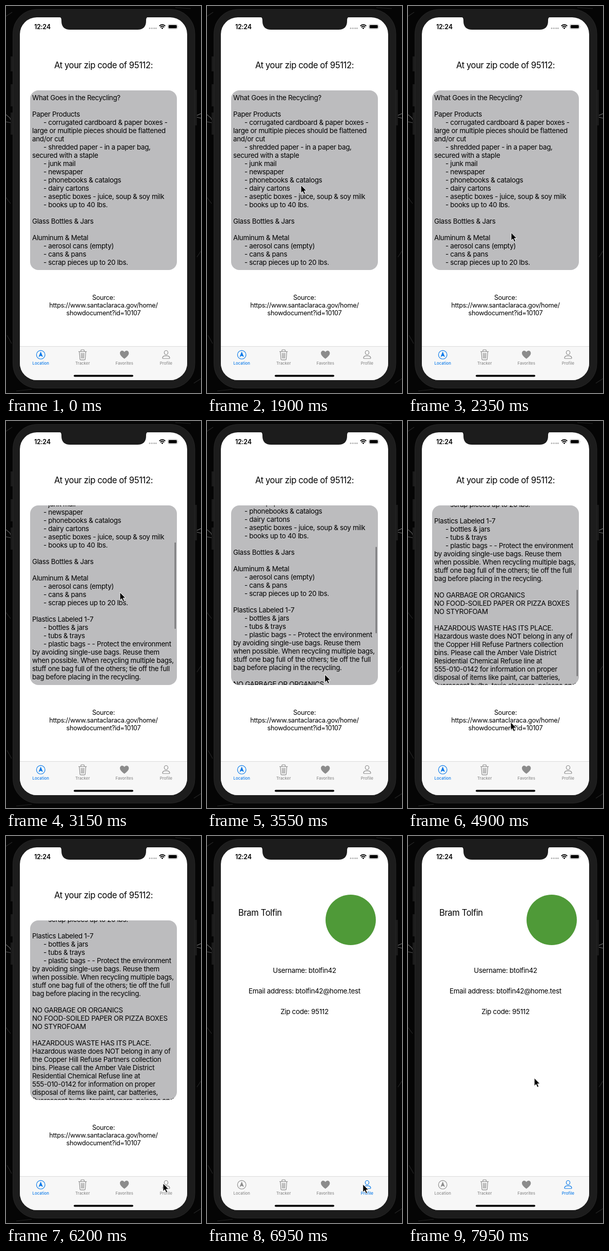
An HTML page for the animation above (8000 ms loop, 380x752 px).

```html
<!DOCTYPE html>
<html lang="en">
<head>
<meta charset="utf-8">
<title>Recycling guide</title>
<style>
html, body { margin: 0; width: 100%; height: 100%; overflow: hidden; background: #050505; }
svg { display: block; width: 380px; height: 752px; }
text { font: 13.4px Inter, "Liberation Sans", sans-serif; letter-spacing: -.023em; white-space: pre; }
.big { font-size: 16.6px; }
.mid { font-size: 12.7px; }
.clock { font-size: 12.6px; font-weight: 600; }
.tab text { font-size: 7.7px; font-weight: 500; letter-spacing: .01em; text-anchor: middle; fill: currentColor; }
.tab { color: #8c8c8c; fill: none; stroke: currentColor; stroke-width: 1.2; stroke-linecap: round; stroke-linejoin: round; }
.tab text, .solid { stroke: none; fill: currentColor; }
.tab.on { color: #0a7aea; }
.c { text-anchor: middle; }
</style>
</head>
<body>
<svg viewBox="0 0 380 752">
  <defs>
    <clipPath id="panelClip"><rect x="47" y="164" width="286" height="349" rx="16"/></clipPath>
    <clipPath id="screenClip"><rect x="27" y="22" width="326" height="705" rx="33"/></clipPath>
  </defs>

  <!-- desktop and phone body -->
  <rect width="380" height="752" fill="#050505"/>
  <g fill="none" stroke="#777" stroke-width="1.2" opacity=".7">
    <path d="M0 211l7 6 5 9M0 225l10 2" />
    <path d="M380 209l-9 4M380 218l-8-2" stroke="#999"/>
    <path d="M0 20l12-8M0 372l9 12M372 488l8-12M2 640l9 16M366 733l14-9M20 748l30-3M330 3l30 2" stroke="#333"/>
  </g>
  <path d="M11 98v29M11 152v43M11 207v43M370 163v69" stroke="#1a1a1a" stroke-width="4"/>
  <rect x="13.5" y="6.500" width="354.500" height="736" rx="47" fill="#1c1c1c" stroke="#262626"/>

  <g clip-path="url(#screenClip)">
    <rect x="27" y="22" width="326" height="705" fill="#fff"/>
    <path d="M102 21q6 0 6 6v2q0 17 17 17h131q17 0 17-17v-2q0-6 6-6z" fill="#1c1c1c"/>
    <text class="clock" x="55" y="44.500">12:24</text>
    <g fill="#b5b5b5"><circle cx="280" cy="43.300" r="1.500"/><circle cx="284.300" cy="43.300" r="1.500"/><circle cx="288.600" cy="43.300" r="1.500"/><circle cx="292.300" cy="43.300" r="1.500"/></g>
    <g fill="none" stroke="#000" stroke-width="1.900">
      <path d="M298.700 38.800q5.800-5 11.600 0M300.800 41.200q3.700-3.200 7.400 0"/>
      <path d="M302.400 42.800q2.100-1.500 4.200 0l-2.100 2.200z" fill="#000" stroke="none"/>
    </g>
    <rect x="315.500" y="35.800" width="18.500" height="8.700" rx="2.500" fill="none" stroke="#aaa" stroke-width=".8"/>
    <rect x="316.800" y="37" width="16" height="6.300" rx="1.500"/>
    <path d="M335.300 38.700q1.300 1.400 0 2.900z" fill="#999"/>

    <g id="guide">
      <text class="big c" x="190" y="121">At your zip code of 95112:</text>
      <rect x="47" y="164" width="286" height="349" rx="16" fill="#bcbcbe"/>
      <g clip-path="url(#panelClip)">
        <g id="list"></g>
        <rect id="bar" x="328.500" y="166" width="2.500" height="168" rx="1.250" fill="#777779"/>
      </g>
      <text class="mid c" x="190" y="570.500">Source:</text>
      <text class="mid c" x="190" y="585.500">https://www.santaclaraca.gov/home/</text>
      <text class="mid c" x="190" y="601">showdocument?id=10107</text>
    </g>

    <g id="profile">
      <text class="big" x="61" y="155">Bram Tolfin</text>
      <circle cx="280" cy="163" r="49" fill="#4f9a38"/>
      <text class="c" x="190" y="266">Username: btolfin42</text>
      <text class="c" x="190" y="306">Email address: btolfin42@home.test</text>
      <text class="c" x="190" y="345.500">Zip code: 95112</text>
    </g>

    <rect x="27" y="661" width="326" height="67" fill="#f7f7f7"/>
    <path d="M27 661.500h326" stroke="#d4d4d4" stroke-width=".8"/>
    <g class="tab" id="location">
      <circle cx="67.700" cy="677.700" r="8.300"/>
      <path class="solid" d="M67.700 671.500l4.300 10.500-4.300-2.200-4.300 2.200z"/>
      <text x="67.700" y="697">Location</text>
    </g>
    <g class="tab">
      <path d="M141.500 671.500h15.400M146 671v-2q0-1 1-1h4.400q1 0 1 1v2M143 672l1 14q.1 1.700 1.700 1.700h7q1.600 0 1.700-1.700l1-14M146.700 674.500l.3 10M149.200 674.500v10M151.700 674.500l-.3 10"/>
      <text x="149.200" y="697">Tracker</text>
    </g>
    <g class="tab">
      <path class="solid" d="M230.700 685.500c-4-3-8.700-6.600-8.700-11 0-5.200 6.500-6.600 8.700-2 2.200-4.600 8.700-3.200 8.700 2 0 4.400-4.700 8-8.700 11z"/>
      <text x="230.700" y="697">Favorites</text>
    </g>
    <g class="tab" id="user">
      <ellipse cx="312" cy="673.500" rx="3.600" ry="4"/>
      <path d="M306.500 685h11q1.700 0 1.500-1.400c-.7-5.300-13.300-5.300-14 0q-.2 1.400 1.500 1.400z"/>
      <text x="312" y="697">Profile</text>
    </g>
    <rect x="132" y="716.700" width="116" height="3.800" rx="1.900"/>
  </g>

  <path id="cursor" d="M0 0v15.500l3.500-3.300 2.500 5.800 2.700-1.200-2.500-5.600h4.800z" stroke="#fff" stroke-width="1"/>
</svg>

<script>
const $ = id => document.getElementById(id);
const LOOP = 8000, PROFILE_AT = 6400, LINE = 16;

// A leading "-" marks an indented line.
const lines = `What Goes in the Recycling?

Paper Products
- corrugated cardboard & paper boxes -
large or multiple pieces should be flattened
and/or cut
- shredded paper - in a paper bag,
secured with a staple
- junk mail
- newspaper
- phonebooks & catalogs
- dairy cartons
- aseptic boxes - juice, soup & soy milk
- books up to 40 lbs.

Glass Bottles & Jars

Aluminum & Metal
- aerosol cans (empty)
- cans & pans
- scrap pieces up to 20 lbs.

Plastics Labeled 1-7
- bottles & jars
- tubs & trays
- plastic bags - - Protect the environment
by avoiding single-use bags. Reuse them
when possible. When recycling multiple bags,
stuff one bag full of the others; tie off the full
bag before placing in the recycling.

NO GARBAGE OR ORGANICS
NO FOOD-SOILED PAPER OR PIZZA BOXES
NO STYROFOAM

HAZARDOUS WASTE HAS ITS PLACE.
Hazardous waste does NOT belong in any of
the Copper Hill Refuse Partners collection
bins. Please call the Amber Vale District
Residential Chemical Refuse line at
555-010-0142 for information on proper
disposal of items like paint, car batteries,
fluorescent bulbs, toxic cleaners, poisons and`.split("\n");

lines.forEach((line, i) => {
  const el = document.createElementNS("http://www.w3.org/2000/svg", "text");
  el.setAttribute("x", line[0] === "-" ? 73 : 51);
  el.setAttribute("y", 183 + i * LINE);
  el.textContent = line;
  $("list").append(el);
});

// Rows of [time, ...values]
const pointer = [
  [50, -20, 560], [850, 196, 297], [1050, 194, 300], [1200, 194, 300],
  [1400, 161, 360], [1650, 183, 348], [1900, 183, 348], [2600, 212, 478],
  [3150, 222, 333], [3250, 222, 325], [3600, 230, 502], [3950, 229, 411],
  [4300, 224, 338], [4400, 224, 323], [4550, 224, 323], [4900, 200, 585],
  [5350, 228, 640], [6200, 306, 675], [6400, 306, 675], [7150, 302, 677],
  [7550, 171, 146], [7950, 246, 470], [8000, 248, 478]
];
const scroll = [[2600, 0], [3150, 145], [3350, 163], [3600, 163], [3950, 256], [4300, 336]];
const barFade = [[2600, 0], [2700, 1], [5400, 1], [5650, 0]];

// Smooth interpolation that never overshoots the keys.
function at(keys, t, k = 1) {
  const last = keys.length - 1;
  if (t <= keys[0][0]) return keys[0][k];
  if (t >= keys[last][0]) return keys[last][k];
  const i = keys.findIndex(key => key[0] > t) - 1;
  const rate = j => j < 0 || j >= last ? 0 : (keys[j + 1][k] - keys[j][k]) / (keys[j + 1][0] - keys[j][0]);
  const slope = j => {
    const a = rate(j - 1), b = rate(j);
    return a * b > 0 ? 2 * a * b / (a + b) : 0;
  };
  const span = keys[i + 1][0] - keys[i][0], u = (t - keys[i][0]) / span, v = 1 - u;
  return v * v * (1 + 2 * u) * keys[i][k] + u * u * (3 - 2 * u) * keys[i + 1][k]
    + span * u * v * (v * slope(i) - u * slope(i + 1));
}

const move = (id, x, y) => $(id).setAttribute("transform", `translate(${x} ${y})`);

function draw(now) {
  const t = now % LOOP, onProfile = t >= PROFILE_AT, offset = at(scroll, t);
  $("guide").style.display = onProfile ? "none" : "";
  $("profile").style.display = onProfile ? "" : "none";
  $("location").classList.toggle("on", !onProfile);
  $("user").classList.toggle("on", onProfile);
  move("list", 0, -Math.round(offset));
  move("bar", 0, offset * .482);
  $("bar").style.opacity = at(barFade, t);
  move("cursor", at(pointer, t, 1), at(pointer, t, 2));
  requestAnimationFrame(draw);
}
requestAnimationFrame(draw);
</script>
</body>
</html>
```
